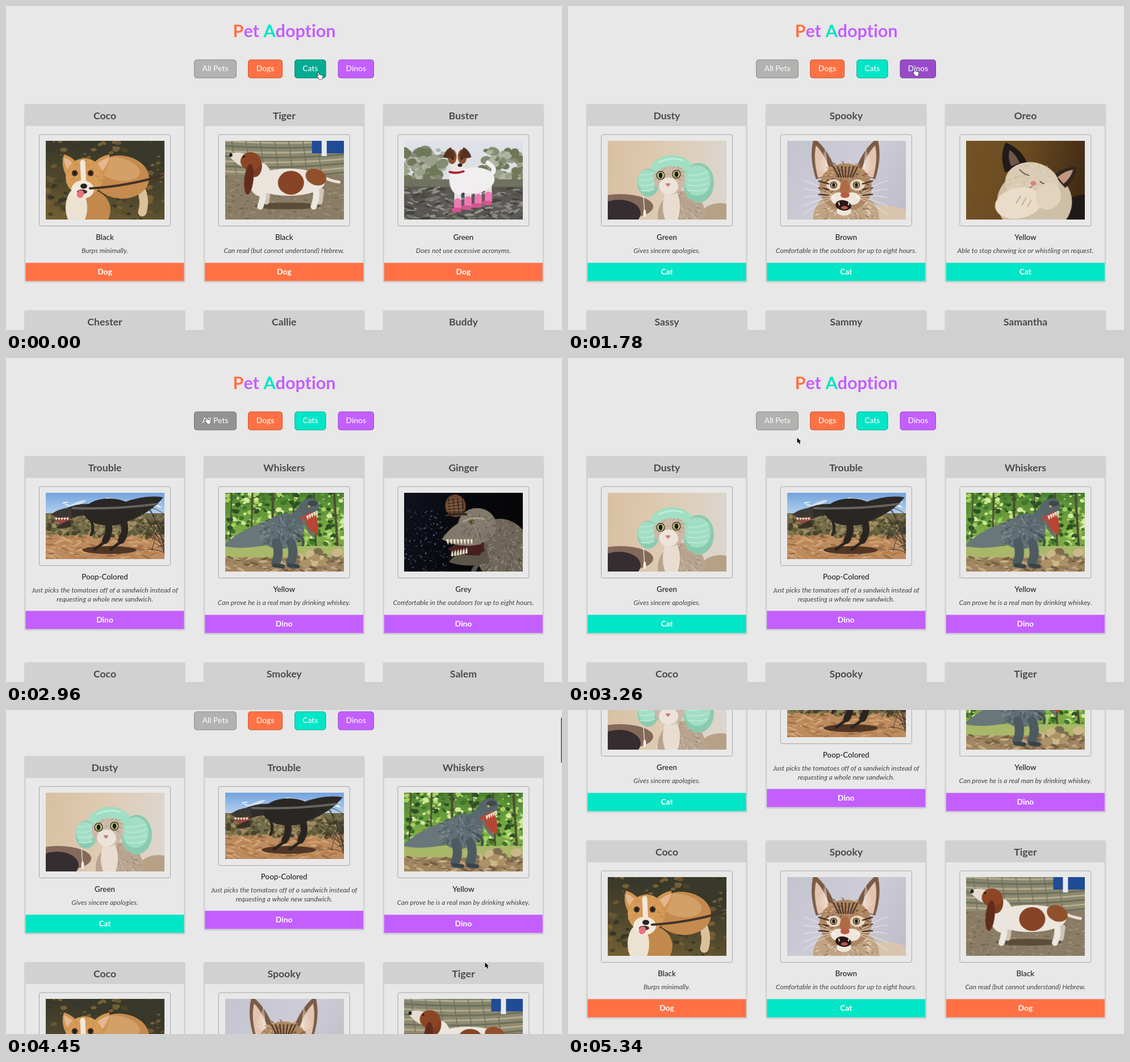
Recreate the animation shown at these times as an HTML page with a canvas. Size 979 by 572 pixels, loop 5.63 s.

```html
<!DOCTYPE html>
<html lang="en">
<head>
<meta charset="utf-8">
<title>Pet Adoption</title>
<style>
html, body { margin: 0; width: 100%; height: 100%; overflow: hidden; background: #e8e8e8; }
canvas { display: block; }
</style>
</head>
<body>
<canvas id="stage" width="979" height="572"></canvas>
<script>
const LOOP = 5630, STEP = 148.5, W = 979, H = 572;
const FONT = 'Lato, "Open Sans", sans-serif';
const ORANGE = '#ff7144', TEAL = '#00e6c6', PURPLE = '#c35fff', PAGE = '#e8e8e8', GREY = '#d1d1d1';
const KINDS = { Dog: ORANGE, Cat: TEAL, Dino: PURPLE };
const stage = document.getElementById('stage').getContext('2d');
stage.letterSpacing = '0.02px'; // switches ligatures off
let g = stage, seed = 1;

const rand = () => (seed = seed * 16807 % 2147483647) / 2147483647;
const times = (n, draw) => { for (let i = 0; i < n; i++) draw(i); };

// Drawing helpers, all acting on the current context g
function rect(c, x, y, w, h, r = 0) {
  g.fillStyle = c;
  g.beginPath();
  g.roundRect(x, y, w, h, r);
  g.fill();
}
function outline(c, x, y, w, h, r) {
  g.strokeStyle = c;
  g.lineWidth = 1;
  g.beginPath();
  g.roundRect(x + 0.5, y + 0.5, w - 1, h - 1, r);
  g.stroke();
}
function oval(c, x, y, rx, ry = rx, turn = 0) {
  g.fillStyle = c;
  g.beginPath();
  g.ellipse(x, y, rx, ry, turn, 0, 7);
  g.fill();
}
// A round-ended stroke that bows sideways by bend
function limb(c, w, x, y, x1, y1, bend = 0) {
  const len = Math.hypot(x1 - x, y1 - y);
  g.strokeStyle = c;
  g.lineWidth = w;
  g.lineCap = 'round';
  g.beginPath();
  g.moveTo(x, y);
  g.quadraticCurveTo((x + x1) / 2 - (y1 - y) / len * bend, (y + y1) / 2 + (x1 - x) / len * bend, x1, y1);
  g.stroke();
}
// A taper from a base of half-width w to a tip: ears, tails, snouts, teeth
function leaf(c, x, y, x1, y1, w) {
  const dx = x1 - x, dy = y1 - y, len = Math.hypot(dx, dy), nx = -dy / len * w, ny = dx / len * w;
  g.fillStyle = c;
  g.beginPath();
  g.moveTo(x + nx, y + ny);
  g.quadraticCurveTo(x + nx + dx * 0.6, y + ny + dy * 0.6, x1, y1);
  g.quadraticCurveTo(x - nx + dx * 0.6, y - ny + dy * 0.6, x - nx, y - ny);
  g.fill();
}
function scatter(colors, n, x, y, w, h, rx, ry = rx) {
  times(n, i => {
    const k = 0.4 + rand();
    oval(colors[i % colors.length], x + rand() * w, y + rand() * h, rx * k, ry * k, rand() - 0.5);
  });
}
// Short random hairs inside an oval, running outwards from its centre
function fur(colors, n, x, y, rx, ry) {
  times(n, i => {
    const a = rand() * 6.3, r = Math.sqrt(rand()), cx = Math.cos(a) * r, cy = Math.sin(a) * r;
    limb(colors[i % colors.length], 1.5, x + cx * rx, y + cy * ry, x + cx * (rx + 6), y + cy * (ry + 6) + 2);
  });
}
function fade(x, y, ...colors) {
  const f = g.createLinearGradient(0, 0, x, y);
  colors.forEach((c, i) => f.addColorStop(i / (colors.length - 1), c));
  rect(f, 0, 0, 209, 139);
}
function eyes(x, y, gap, r, iris, tilt = 0) {
  for (const s of [-1, 1]) {
    oval('#2f2620', x + s * gap, y + s * tilt, r + 1.2);
    oval(iris, x + s * gap, y + s * tilt, r);
    oval('#191512', x + s * gap, y + s * tilt, r * 0.5, r * 0.75);
  }
}
function teeth(n, x, y, dx, dy, size) {
  times(n, i => leaf('#ece3d0', x + i * dx, y + i * dy, x + i * dx + 1, y + i * dy + size, 2));
}

// Pictures, each 209 wide
const art = {
  corgi() {
    fade(-30, 139, '#39382a', '#524a2d', '#7a6334');
    scatter(['#6a5730', '#37372a', '#756035', '#4a4429'], 150, 0, 0, 209, 139, 5, 3);
    limb('#dcc09a', 15, 167, 84, 170, 126, -8);
    oval('#c48a4e', 132, 64, 50, 38, 0.1);
    oval('#d3a067', 128, 50, 38, 20, 0.2);
    oval('#c2884c', 76, 122, 38, 36);
    oval('#ece2d2', 54, 118, 19, 34);
    for (const [x, tip] of [[48, 32], [90, 112]]) {
      leaf('#d29553', x, 54, tip, 24, 14);
      leaf('#e4b691', x, 52, tip, 29, 8);
    }
    oval('#d59a56', 68, 64, 33, 33);
    fur(['#dda764', '#c58a48'], 60, 68, 62, 29, 28);
    limb('#f1e8da', 9, 65, 38, 67, 80);
    oval('#f1e8da', 65, 86, 20, 16);
    eyes(65, 57, 14, 4, '#4a3428');
    oval('#29211e', 67, 80, 6, 4.5);
    oval('#4b2c27', 64, 90, 9, 4);
    oval('#e8737c', 61, 94, 6, 7, 0.5);
    limb('#43322a', 4, 78, 84, 206, 61, 8);
  },
  basset() {
    fade(0, 139, '#85866f', '#968d70', '#897b63');
    times(8, i => limb(i % 2 ? '#6b705c' : '#b3ac90', 3, 0, i * 9, 209, i * 8, 8));
    times(7, i => limb('#6d6f5b', 1.5, 12 + i * 25, 0, 20 + i * 25, 62));
    rect('#8a7c65', 0, 60, 209, 79);
    rect('#204b96', 153, 0, 56, 22);
    rect('#e6e9ee', 170, 0, 9, 27);
    scatter(['#a0927a', '#75674f', '#948770', '#82745c'], 320, 0, 62, 209, 77, 3, 1);
    oval('#5b4c3a', 110, 115, 58, 6);
    limb('#e9e0d6', 5, 168, 62, 201, 73, 3);
    for (const x of [62, 156]) {
      limb('#cfc5b8', 9, x + 14, 88, x + 11, 108);
      limb('#ece7e0', 11, x + 4, 86, x, 116, -4);
    }
    oval('#ebe5dd', 112, 73, 64, 24);
    oval('#ebe5dd', 62, 68, 20, 30);
    oval('#864425', 116, 74, 23, 21);
    oval('#91502c', 160, 64, 19, 14, 0.4);
    oval('#7e3d22', 52, 44, 13, 20);
    leaf('#e6ddd2', 40, 37, 5, 23, 12);
    oval('#8c4626', 45, 36, 18, 16);
    oval('#612c1b', 42, 68, 8, 27, 0.1);
    oval('#27201d', 10, 25, 3, 3.5);
    oval('#2c1c16', 33, 28, 2);
  },
  terrier() {
    fade(0, 139, '#dfe2ea', '#dcdfe2', '#c5c8bf');
    for (const x of [-8, 138]) scatter(['#858b73', '#9ba08b', '#707859', '#afb3a1'], 100, x, 16, 76, 56, 8, 6);
    rect('#6f725e', 0, 68, 209, 14);
    rect('#5b5955', 0, 81, 209, 58);
    scatter(['#77746f', '#44433f', '#918f8b', '#555049'], 220, 0, 84, 209, 55, 7, 2);
    limb('#f2eff0', 8, 146, 64, 147, 39, 22);
    times(4, i => {
      const x = 94 + i * 18, y = 118 - i * 4;
      limb('#e5dfe1', 12, x, 78, x, y - 10);
      limb('#ef79b3', 13, x, y - 10, x, y);
      limb('#d4558f', 8, x - 7, y + 4, x + 2, y + 4);
    });
    oval('#f1eeef', 121, 70, 38, 23, -0.1);
    oval('#f1eeef', 95, 68, 16, 27);
    oval('#ece6e2', 94, 36, 14, 20);
    for (const s of [-1, 1]) {
      oval('#88502e', 93 + s * 9, 28, 8, 13);
      leaf('#593322', 93 + s * 7, 19, 93 + s * 25, 29, 9);
      oval('#211816', 93 + s * 8, 31, 2);
    }
    oval('#241c1b', 98, 43, 4, 3);
    limb('#ad2534', 4, 80, 55, 104, 54, 4);
  },
  woolCat() {
    fade(209, 20, '#d8c0a2', '#decbb3', '#ddd5cd');
    oval('#84695a', 22, 116, 58, 22);
    oval('#362d31', 20, 128, 38, 24);
    oval('#b7a186', 198, 132, 34, 22);
    oval('#b9a48f', 130, 132, 42, 44);
    fur(['#a48e7c', '#cfbda9'], 80, 132, 120, 30, 30);
    oval('#e8ddd0', 112, 116, 15, 34);
    for (const [x, r] of [[71, 19], [160, 27]]) {
      oval('#8acbb0', x, 74, r, r * 1.3);
      oval('#a2dec5', x - 2, 70, r * 0.85, r);
      times(4, i => limb('#b7e9d5', 2, x - r * 0.7, 60 + i * 9, x + r * 0.6, 55 + i * 10, 5));
    }
    oval('#9cdcc1', 113, 48, 33, 23);
    oval('#cab9a7', 109, 66, 28, 29);
    fur(['#b39e8b', '#d8cabb'], 60, 109, 58, 22, 18);
    oval('#ece3d9', 107, 80, 17, 15);
    limb('#a0dfc4', 17, 84, 46, 139, 43, -17);
    limb('#bdeed9', 3, 90, 38, 131, 34, -8);
    eyes(107, 60, 14, 6.5, '#b9c472', -1);
    leaf('#c4817b', 106, 75, 106, 81, 4);
    limb('#e6e9dc', 1.3, 63, 98, 65, 132);
    oval('#eeeedf', 65, 128, 2.5, 7);
  },
  maineCoon() {
    fade(209, 139, '#c4c4d0', '#cdccd7', '#bebcc8');
    oval('#d9c5ae', 166, 134, 52, 20);
    oval('#bfa382', 104, 136, 58, 48);
    fur(['#ece2d5', '#927458', '#d7bfa1'], 130, 104, 128, 48, 26);
    for (const s of [-1, 1]) {
      leaf('#7a5b45', 103 + s * 34, 62, 103 + s * 56, -5, 19);
      leaf('#e3c4b0', 103 + s * 37, 62, 103 + s * 52, 8, 12);
      times(7, i => limb('#f4ebe1', 1, 103 + s * 30, 62, 103 + s * (36 + i * 2), 16 + i * 5));
    }
    oval('#ad8663', 103, 82, 46, 42);
    fur(['#d1ad84', '#6d4c35', '#b98d61'], 150, 103, 70, 38, 32);
    times(7, i => limb('#50382a', 2.5, 91 + i * 4, 64, 82 + i * 7, 46));
    for (const s of [-1, 1]) {
      oval('#e9d9c2', 103 + s * 21, 78, 13, 10);
      times(3, i => limb('#493529', 2.5, 103 + s * 30, 76 + i * 10, 103 + s * 47, 71 + i * 12));
      oval('#efe7dc', 103 + s * 11, 102, 15, 11);
    }
    eyes(102, 78, 20, 5, '#c9a878');
    oval('#b06a45', 102, 84, 9, 15);
    oval('#ba5b42', 102, 96, 8, 5);
    oval('#efe7dc', 100, 124, 13, 8);
    oval('#2d1715', 99, 114, 14, 9, 0.15);
    oval('#b55b55', 101, 118, 6, 3);
    for (const s of [-1, 1]) {
      limb('#fff', 1.8, 100 + s * 9, 109, 100 + s * 8, 113);
      times(5, i => limb('#f8f4ee', 0.8, 103 + s * 18, 100, 103 + s * 74, 70 + i * 15, s * -6));
    }
  },
  sleepyCat() {
    fade(209, 50, '#745325', '#6a4b21', '#432c15');
    oval('#1f1917', 198, 130, 52, 32, -0.4);
    oval('#cfbfa6', 120, 108, 66, 58);
    leaf('#211a18', 88, 48, 69, 3, 21);
    leaf('#6f574a', 86, 42, 76, 16, 8);
    leaf('#312620', 164, 72, 194, 46, 15);
    leaf('#c29780', 166, 70, 188, 51, 8);
    oval('#dacbb5', 116, 76, 48, 38, 0.2);
    fur(['#e5d9c6', '#cbb99f'], 90, 118, 74, 40, 32);
    limb('#5c4637', 1.8, 94, 51, 110, 61, 3);
    limb('#5c4637', 1.8, 130, 72, 148, 79, 3);
    oval('#d88279', 118, 75, 5, 4);
    limb('#936a58', 1.3, 116, 80, 102, 85, -3);
    oval('#e9dcc8', 92, 110, 42, 27, -0.2);
    oval('#e2d3bc', 144, 98, 22, 24, 0.4);
    times(3, i => limb('#b6a28a', 1.5, 96 + i * 9, 97 + i * 4, 88 + i * 10, 110 + i * 3));
  },
  desertDino() {
    fade(0, 60, '#72a2de', '#a9c9ea', '#c3d7ea');
    scatter(['#edf3f8', '#d2e1f0'], 14, 10, 15, 190, 12, 14, 2.5);
    rect('#736b49', 0, 36, 209, 42);
    rect('#bd8b5d', 0, 74, 209, 65);
    scatter(['#5f5d39', '#8a7f58', '#48432d', '#a18b60'], 260, 0, 38, 209, 40, 4, 3);
    scatter(['#d3a477', '#9d6f49', '#b5804f'], 130, 0, 78, 209, 39, 7, 1.5);
    oval('#513626', 112, 101, 48, 7);
    leaf('#2b2826', 140, 34, 207, 8, 17);
    limb('#2f2c29', 20, 36, 38, 94, 32, -10);
    oval('#292624', 112, 34, 45, 24);
    limb('#65655f', 4, 48, 27, 195, 20, 6);
    leaf('#3b3833', 46, 36, 9, 38, 10);
    leaf('#984b40', 42, 48, 14, 50, 6);
    leaf('#393029', 44, 54, 18, 62, 6);
    teeth(5, 18, 44, 5, 0, 4);
    for (const x of [108, 136]) {
      limb('#292520', 12, x, 48, x - 3, 84, -9);
      limb('#292520', 5, x - 3, 86, x - 22, 100);
    }
    limb('#2a2622', 5, 80, 50, 80, 74, -6);
    times(24, () => limb('#3f372f', 1, 209, 30 + rand() * 85, 166 + rand() * 34, 22 + rand() * 82, 5));
  },
  forestDino() {
    fade(0, 139, '#4a802f', '#80ae48', '#70964a');
    scatter(['#a5d060', '#40752d', '#d3e99a', '#5c9438', '#2a5224'], 420, 0, 0, 209, 100, 4, 3);
    times(6, i => limb('#4c4c32', 2 + i % 3, 8 + i * 38, 94, 12 + i * 36, 0));
    rect('#a9b868', 0, 94, 209, 20);
    rect('#a38662', 0, 114, 209, 25);
    scatter(['#c6ab80', '#745e43', '#8f7b58'], 90, 0, 114, 209, 25, 7, 2);
    scatter(['#ad9267', '#cbb789', '#7e6e51'], 28, 126, 104, 72, 22, 8, 6);
    leaf('#69777a', 84, 68, -4, 94, 20);
    oval('#5f6f74', 102, 68, 38, 30, -0.4);
    limb('#59696e', 27, 118, 58, 146, 30, -4);
    fur(['#879599', '#465358', '#6f7d80'], 130, 98, 68, 34, 26);
    for (const x of [90, 116]) {
      limb('#4d5a5f', 16, x, 88, x - 1, 124, -8);
      limb('#394348', 7, x - 3, 128, x + 12, 130);
    }
    oval('#566569', 148, 24, 18, 14, -0.3);
    oval('#3f494b', 154, 19, 9, 5);
    leaf('#b94535', 144, 38, 162, 74, 14);
    limb('#65726f', 5, 138, 48, 156, 76, 5);
    teeth(5, 145, 40, 4, -2, 8);
    oval('#e0b458', 148, 24, 2);
    limb('#465155', 5, 128, 74, 137, 92, -8);
  },
  hatDino() {
    fade(209, 80, '#10121e', '#08090d', '#050506');
    scatter(['#44506e', '#27314a', '#667391'], 190, 0, 30, 80, 109, 1);
    oval('#6e665b', 176, 106, 50, 62, -0.4);
    fur(['#8a8172', '#4d473f', '#9a9181'], 190, 176, 102, 42, 52);
    leaf('#5d564b', 146, 104, 78, 122, 20);
    leaf('#481f20', 140, 94, 76, 100, 16);
    oval('#81796b', 128, 58, 34, 31);
    leaf('#81796b', 130, 66, 66, 82, 25);
    fur(['#958c7d', '#686054'], 80, 128, 58, 28, 22);
    teeth(8, 76, 82, 6, 0, 10);
    teeth(6, 84, 112, 5, -1, -11);
    eyes(118, 51, 0, 3, '#c2a65c');
    limb('#aaa190', 3, 104, 50, 140, 46, -6);
    oval('#69452f', 90, 23, 18, 20, -0.2);
    times(4, i => {
      limb('#31261f', 2, 78 + i * 8, 11, 80 + i * 8, 37);
      limb('#a07752', 1, 74, 17 + i * 5, 105, 12 + i * 6);
    });
    limb('#352820', 4, 74, 40, 109, 38, -3);
    limb('#5b544a', 8, 139, 108, 122, 137);
  }
};

function photo(name, h) {
  const c = document.createElement('canvas');
  c.width = 209;
  c.height = h;
  g = c.getContext('2d');
  seed = 77;
  art[name]();
  g = stage;
  return c;
}
const pet = (name, kind, color, pic, ...about) =>
  ({ name, kind, color, about, pic: photo(pic, about.length > 1 ? 117 : 139) });
const heads = (...names) => names.map(name => ({ name }));

const coco = pet('Coco', 'Dog', 'Black', 'corgi', 'Burps minimally.');
const tiger = pet('Tiger', 'Dog', 'Black', 'basset', 'Can read (but cannot understand) Hebrew.');
const buster = pet('Buster', 'Dog', 'Green', 'terrier', 'Does not use excessive acronyms.');
const dusty = pet('Dusty', 'Cat', 'Green', 'woolCat', 'Gives sincere apologies.');
const spooky = pet('Spooky', 'Cat', 'Brown', 'maineCoon', 'Comfortable in the outdoors for up to eight hours.');
const oreo = pet('Oreo', 'Cat', 'Yellow', 'sleepyCat', 'Able to stop chewing ice or whistling on request.');
const trouble = pet('Trouble', 'Dino', 'Poop-Colored', 'desertDino',
  'Just picks the tomatoes off of a sandwich instead of', 'requesting a whole new sandwich.');
const whiskers = pet('Whiskers', 'Dino', 'Yellow', 'forestDino', 'Can prove he is a real man by drinking whiskey.');
const ginger = pet('Ginger', 'Dino', 'Grey', 'hatDino', 'Comfortable in the outdoors for up to eight hours.');

const dogs = [coco, tiger, buster, ...heads('Chester', 'Callie', 'Buddy')];
const cats = [dusty, spooky, oreo, ...heads('Sassy', 'Sammy', 'Samantha')];
const dinos = [trouble, whiskers, ginger, ...heads('Coco', 'Smokey', 'Salem')];
const all = [dusty, trouble, whiskers, coco, spooky, tiger];

// Everything moves in ticks of STEP ms
const petsAt = n => n < 3 ? dogs : n < 13 ? cats : n < 21 ? dinos : all;
const scrollAt = n => n < 30 ? 0 : n < 31 ? 92 : 307;
const barAt = n => n < 30 ? 0 : Math.max(0, Math.min(1, (35 - n) / 2));

const moves = [
  { from: 4, to: 7, x: 612, y: 118 },
  { from: 13, to: 19, x: 355, y: 111 },
  { from: 21, to: 26, x: 846, y: 451 },
  { from: 32, to: 36, x: 990, y: 562 }
];
function pointerAt(n) {
  let x = 552, y = 124;
  for (const m of moves) {
    const k = Math.max(0, Math.min(1, (n - m.from) / (m.to - m.from)));
    const e = k * k * (3 - 2 * k);
    x += (m.x - x) * e;
    y += (m.y - y) * e;
  }
  return [x, y];
}

const buttons = [
  ['All Pets', 331, 75, '#b2b2b1', '#939393'],
  ['Dogs', 426, 61, ORANGE, '#cc5935'],
  ['Cats', 508, 55.5, TEAL, '#00ab92'],
  ['Dinos', 584.5, 63.5, PURPLE, '#994ac9']
];

function text(s, x, y, font, c, align = 'center') {
  g.font = font + ' ' + FONT;
  g.fillStyle = c;
  g.textAlign = align;
  g.fillText(s, x, y);
}
function heading() {
  const parts = [['P', ORANGE], ['et ', PURPLE], ['A', TEAL], ['doption', PURPLE]];
  const font = 'bold 30.5px';
  g.font = font + ' ' + FONT;
  let x = W / 2 - g.measureText('Pet Adoption').width / 2;
  for (const [s, c] of parts) {
    text(s, x, 55, font, c, 'left');
    x += g.measureText(s).width;
  }
}
function card({ name, kind, color, about, pic }, x, y) {
  const mid = x + 142;
  if (!pic) {
    rect(GREY, x, y, 284, 60, 4);
  } else {
    const low = y + pic.height, foot = y + (about.length > 1 ? 273.5 : 280.5);
    rect(GREY, x, y, 284, foot + 35 - y, 4);
    rect(PAGE, x + 2.5, y + 39, 279, foot - y - 39);
    outline('#a5a5a5', x + 26, y + 53.5, 232, pic.height + 23.5, 3);
    g.drawImage(pic, x + 38, y + 65);
    text(color, mid, low + 101, '500 13.3px', '#222');
    about.forEach((s, i) => text(s, mid, low + 124 + i * 15.5, 'italic 12px', '#444'));
    rect(KINDS[kind], x + 2.5, foot, 279, 32);
    text(kind, mid, foot + 20.5, 'bold 13.8px', '#fff');
  }
  text(name, mid, y + 27, 'bold 17.6px', '#4b4a48');
}

const HAND = new Path2D('M-3-5.5q1.5-1 2 .5l1 3 1-.6 1.2.6 1.2-.2 1 1 1 .2v3l-1 2v1.5h-4.5l-3-4.5-1.5-2q.6-1.2 2 0l1 .8z');
const ARROW = new Path2D('M-2.5-5.5v9.5l2.2-2 1.6 3.6 1.7-.8-1.6-3.4h3z');
function cursor(path, x, y, fill, edge) {
  g.save();
  g.translate(x, y);
  g.lineJoin = 'round';
  g.strokeStyle = edge;
  g.lineWidth = 1.2;
  g.stroke(path);
  g.fillStyle = fill;
  g.fill(path);
  g.restore();
}

function draw(t) {
  const n = Math.floor((t + 13) / STEP);
  const [mx, my] = pointerAt(n), scroll = scrollAt(n);
  const over = ([, x, w]) => mx >= x && mx < x + w && my + scroll >= 95 && my + scroll < 128;

  rect(PAGE, 0, 0, W, H);
  g.save();
  g.translate(0, -scroll);
  heading();
  for (const b of buttons) {
    const [label, x, w, color, dark] = b;
    rect(over(b) ? dark : color, x, 94.5, w, 33, 5);
    outline('rgba(0,0,0,.22)', x, 94.5, w, 33, 5);
    text(label, x + w / 2, 115, '500 13.8px', '#f8f8f8');
  }
  petsAt(n).forEach((p, i) => card(p, 32 + i % 3 * 315.7, i < 3 ? 173 : 537));
  g.restore();

  g.globalAlpha = barAt(n);
  rect('#6e6e6e', 977, scroll * 0.1416 - 0.5, 6, 81, 3);
  g.globalAlpha = 1;
  if (buttons.some(over)) cursor(HAND, mx, my, '#fff', '#222');
  else cursor(ARROW, mx, my, '#000', '#fff');
}

let start;
function tick(now) {
  start ??= now;
  draw((now - start) % LOOP);
  requestAnimationFrame(tick);
}
draw(0);
requestAnimationFrame(tick);
</script>
</body>
</html>
```
